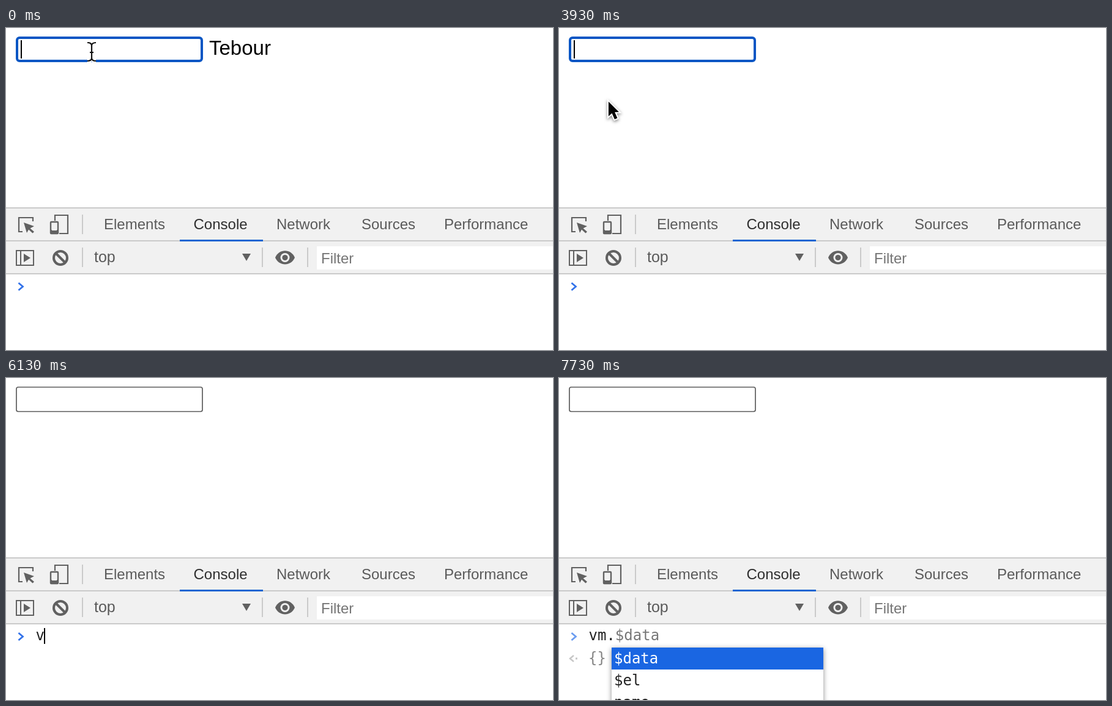
An HTML page with a canvas for the animation above (8000 ms loop, 894 by 528 pixels).

```html
<!DOCTYPE html>
<html lang="en">
<head>
<meta charset="utf-8">
<title>Two-way binding in the console</title>
<style>
  html, body { margin: 0; width: 100%; height: 100%; overflow: hidden; background: #fff; }
  canvas { display: block; }
</style>
</head>
<body>
<canvas id="stage" width="894" height="528"></canvas>
<script>
const LOOP = 8000;
const ctx = document.getElementById('stage').getContext('2d');
const SANS = '"Liberation Sans", Arial, sans-serif';
const MONO = '"DejaVu Sans Mono", Menlo, monospace';
const CHAR = 14.45;
const BLUE = '#1a66e2', ICON = '#616161', RULE = '#cacaca';

// [start time, value]: the last entry that has started applies
const TYPED = [[0, ''], [800, 'H'], [1070, 'He'], [1200, 'Hel'], [1330, 'Hell'], [1530, 'Hello'],
  [2530, 'Hell'], [2670, 'Hel'], [2800, 'He'], [3000, 'H'], [3330, '']];
const COMMAND = [[0, ''], [6130, 'v'], [6400, 'vm'], [7030, 'vm.']];
const CARET_OFF = [[200, 700], [2000, 2500], [4030, 4530], [5530, 6000], [7530, 8000]];
const POINTER = [[3870, 112, 72], [3930, 80, 118], [4070, 68, 220], [4270, 72, 366],
  [4470, 66, 379], [4600, 12, 412], [4730, 24, 422], [4870, 30, 424]];
const BLUR = 4900, POINTER_HIDE = 6000;

const at = (track, t) => track.filter(k => k[0] <= t).pop()[1];
const within = (t, a, b) => t >= a && t < b;

function rect(x, y, w, h, color) {
  ctx.fillStyle = color;
  ctx.fillRect(x, y, w, h);
}

function text(s, x, y, color, font) {
  ctx.font = font || `24px ${SANS}`;
  ctx.fillStyle = color;
  ctx.fillText(s, x, y);
  return ctx.measureText(s).width;
}

const mono = (s, x, y, color, weight = '') => text(s, x, y, color, `${weight} 24px ${MONO}`);

function trace(points, close) {
  ctx.beginPath();
  for (let i = 0; i < points.length; i += 2) ctx.lineTo(points[i], points[i + 1]);
  if (close) ctx.closePath();
}

function line(points, color, width) {
  trace(points);
  ctx.strokeStyle = color;
  ctx.lineWidth = width;
  ctx.stroke();
}

function shape(points, color) {
  trace(points, true);
  ctx.fillStyle = color;
  ctx.fill();
}

function box(x, y, w, h, r, color, width) {
  ctx.beginPath();
  ctx.roundRect(x, y, w, h, r);
  ctx.strokeStyle = color;
  ctx.lineWidth = width;
  ctx.stroke();
}

function shadowed(draw, blur, dy, color) {
  ctx.save();
  ctx.shadowColor = color;
  ctx.shadowBlur = blur;
  ctx.shadowOffsetY = dy;
  draw();
  ctx.restore();
}

function page(t, caretOn) {
  const value = at(TYPED, t), focused = t < BLUR;
  if (focused) box(18, 16, 302, 38, 4, '#0a56c4', 4);
  else box(17, 15, 304, 40, 3, '#5c5c5c', 1.7);
  const width = text(value, 24, 44, '#000', `26.67px ${SANS}`);
  if (focused && caretOn) rect(24 + Math.round(width), 20, 2, 30, '#000');
  text(t < 800 ? 'Tebour' : value, 332, 44, '#000', `33px ${SANS}`);
}

function inspectIcon() {
  line([27, 334, 21, 334, 21, 311, 44, 311, 44, 317], ICON, 2.2);
  shape([29, 319, 46, 325, 39.5, 328.5, 46, 334, 43.5, 336.5, 37, 330.5, 34, 336], ICON);
}

function deviceIcon() {
  line([80, 316, 80, 307, 101, 307, 101, 337, 87, 337], ICON, 2.2);
  box(73, 318, 12, 19, 1, ICON, 2.4);
  rect(73, 331, 12, 5, ICON);
  rect(75, 320, 8, 12, '#f1f1f1');
}

function clearIcon(color) {
  ctx.beginPath();
  ctx.arc(89, 377, 11, 0, Math.PI * 2);
  ctx.strokeStyle = color;
  ctx.lineWidth = 4;
  ctx.stroke();
  line([81, 369, 97, 385], color, 4);
}

function eyeIcon() {
  ctx.beginPath();
  ctx.moveTo(440, 376.5);
  ctx.bezierCurveTo(446, 361.5, 466, 361.5, 472, 376.5);
  ctx.bezierCurveTo(466, 391, 446, 391, 440, 376.5);
  ctx.fillStyle = ICON;
  ctx.fill();
  for (const [r, color] of [[7.5, '#f1f1f1'], [4.6, ICON]]) {
    ctx.beginPath();
    ctx.arc(456, 376.5, r, 0, Math.PI * 2);
    ctx.fillStyle = color;
    ctx.fill();
  }
}

function toolbars(t) {
  rect(0, 294, 894, 110, '#f1f1f1');
  for (const y of [294, 348, 402]) rect(0, y, 894, 2, RULE);
  for (const [x, y] of [[124, 306], [124, 360], [418, 360], [492, 360]]) rect(x, y, 2, 32, RULE);
  inspectIcon();
  deviceIcon();
  const tabs = { Elements: 160, Console: 306.5, Network: 442, Sources: 581, Performance: 716 };
  for (const [name, x] of Object.entries(tabs)) {
    text(name, x, 330, name === 'Console' ? '#2f2f2f' : '#5a5a5a');
  }
  rect(284, 347, 136, 3, '#1b66d2');

  box(17, 365, 28, 24, 0, ICON, 2);
  rect(23, 365, 2, 24, ICON);
  shape([29, 370, 40, 377, 29, 384], ICON);
  clearIcon(within(t, 4230, 4570) ? '#2d2d2d' : ICON);
  text('top', 144, 384, '#5a5a5a', `25px ${SANS}`);
  shape([386, 370, 400, 370, 393, 382], ICON);
  eyeIcon();
  rect(508, 358, 386, 38, '#fff');
  text('Filter', 515, 386, '#757575');
}

function chevron(x, y, size, color) {
  line([x, y - size, x + size + 1, y, x, y + size], color, 2.8);
}

function result(t) {
  if (t < 6530) return;
  line([24, 455, 18, 460, 24, 465], '#c6c6c6', 2.4);
  rect(27, 458.5, 3, 3, '#c6c6c6');
  mono(t < 7200 ? 'Vue {$el: div#app, $data: {…}}' : '{}', 48, 467, '#858585');
}

function popup(x, y, w, h) {
  shadowed(() => rect(x, y, w, h, '#fff'), 8, 2, 'rgba(0,0,0,.45)');
  rect(x, y, w, 36, BLUE);
}

function list(x, y, w, items) {
  popup(x, y, w, items.length * 36);
  items.forEach((s, i) => mono(s, x + 4, y + 26 + i * 36, i ? '#222' : '#fff'));
}

function suggestions(t) {
  if (within(t, 6200, 6400)) {
    list(42, 442, 318, ['valueOf', 'var', 'visualViewport']);
  } else if (within(t, 6400, 6970)) {
    popup(42, 332, 318, 72);
    rect(42, 368, 318, 36, '#f6f6f6');
    mono('vm', 46, 358, '#fff', 'bold');
    chevron(52, 386, 5, '#2f6fe4');
    mono('vm.', 66, 394, '#222b35', 'bold');
    mono('name = "hello"', 66 + 3 * CHAR, 394, '#333');
  } else if (t >= 7100) {
    list(86, 442, 346, ['$data', '$el', 'name']);
  }
}

function prompt(t, caretOn) {
  const command = at(COMMAND, t), end = 48.5 + command.length * CHAR;
  chevron(20.5, 424, 6, t < 7100 ? '#3272ea' : '#6b9cf0');
  mono(command, 48.5, 430, '#222');
  if (within(t, 6200, 6400)) mono('alueOf', end, 430, '#777');
  if (t >= 7100) mono('$data', end, 430, '#777');
  if (t >= BLUR && caretOn) rect(Math.floor(end), 410, 2, 26, '#000');
}

function tooltip() {
  shadowed(() => rect(61, 407, 320, 50, '#f1f1f1'), 6, 2, 'rgba(0,0,0,.4)');
  box(61.5, 407.5, 319, 49, 1, '#bdbdbd', 1.5);
  text('Clear console', 78, 440, '#303030');
  text('Ctrl L', 241, 440, '#707070', `24.5px ${SANS}`);
  text('⌘', 317, 440, '#707070', '24px "DejaVu Sans", sans-serif');
  text('K', 348, 440, '#707070');
}

function textCursor(x, y) {
  ctx.save();
  ctx.translate(x, y);
  ctx.beginPath();
  for (const s of [-1, 1]) {
    ctx.moveTo(-7, 15 * s);
    ctx.quadraticCurveTo(0, 15 * s, 0, 10 * s);
    ctx.quadraticCurveTo(0, 15 * s, 7, 15 * s);
  }
  ctx.moveTo(0, -11);
  ctx.lineTo(0, 11);
  ctx.moveTo(-3, 1);
  ctx.lineTo(3, 1);
  for (const [color, width] of [['#fff', 6], ['#111', 2.2]]) {
    ctx.strokeStyle = color;
    ctx.lineWidth = width;
    ctx.stroke();
  }
  ctx.restore();
}

function arrow(t) {
  let i = POINTER.length - 1;
  while (i && POINTER[i][0] > t) i--;
  const a = POINTER[i], b = POINTER[i + 1] || a;
  const k = a === b ? 0 : (t - a[0]) / (b[0] - a[0]);
  ctx.save();
  ctx.translate(a[1] + (b[1] - a[1]) * k, a[2] + (b[2] - a[2]) * k);
  trace([1, 2, 1, 26, 6.6, 21, 11, 31, 15.5, 29, 11.2, 19.2, 18, 19], true);
  ctx.strokeStyle = '#fff';
  ctx.lineWidth = 4;
  shadowed(() => ctx.stroke(), 5, 2, 'rgba(0,0,0,.5)');
  ctx.fillStyle = '#000';
  ctx.fill();
  ctx.restore();
}

function draw(t) {
  const caretOn = !CARET_OFF.some(([a, b]) => within(t, a, b));
  rect(0, 0, 894, 528, '#fff');
  page(t, caretOn);
  toolbars(t);
  prompt(t, caretOn);
  result(t);
  suggestions(t);
  if (within(t, 4430, 4730)) tooltip();
  if (t < 800) textCursor(140, 39);
  if (within(t, POINTER[0][0], POINTER_HIDE)) arrow(t);
}

const start = performance.now();
function tick() {
  draw((performance.now() - start) % LOOP);
  requestAnimationFrame(tick);
}
tick();
</script>
</body>
</html>
```
